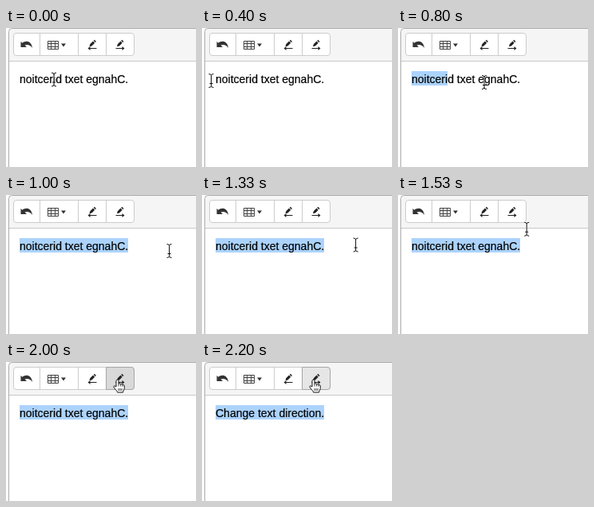
These frames come from a looping animation (238x174 px, 2.79 s). An HTML page:

```html
<!DOCTYPE html>
<html lang="en">
<head>
<meta charset="utf-8">
<title>Change text direction</title>
<style>
  html, body { margin: 0; height: 100%; overflow: hidden; background: #fff; }
  svg { display: block; width: 100vw; height: 100vh; }
  text { font: 14px "Liberation Sans", Arial, sans-serif; white-space: pre; stroke: #000; stroke-width: .2px; }
</style>
</head>
<body>
<svg viewBox="0 0 238 174">
  <defs>
    <path id="pencil" fill="#222" d="M0 8.500 .8 5.500 4.500 1.800 6.700 4 3 7.700ZM5.200 1.100 6.300 0 8.500 2.200 7.400 3.300Z"/>
    <path id="arrow" fill="#222" d="M0 2.500 3 0V2H11V3H3V5Z"/>
    <path id="stem" d="M-3-8.500Q0-8.500 0-6.500 0-8.500 3-8.500M0-6.500V6.500M-3 8.500Q0 8.500 0 6.500 0 8.500 3 8.500M-2 3.500H2"/>
  </defs>

  <path d="M3.500 180V4.500Q3.500.5 7.500.5H240V41.500H3.500" fill="#f5f5f5"/>
  <path d="M3.500 41.500H240" stroke="#c8c8c8"/>
  <path d="M3.500 180V4.500Q3.500.5 7.500.5H240" fill="none" stroke="#aaa"/>

  <rect x="9.500" y="6.500" width="151" height="28" rx="3.500" fill="#fff" stroke="#ccc"/>
  <path d="M42.500 7V34M90.500 7V34M125.500 7V34" stroke="#ccc"/>
  <path id="button" d="M125.500 6.500H157Q160.500 6.500 160.500 10V31Q160.500 34.500 157 34.500H125.500Z" stroke="#a6a6a6"/>

  <path fill="#333" d="M18.500 17 20.500 18.800C25 15 32 16.500 33 25 30 21 27 20.500 23.500 21.600L26 24H18.500Z"/>
  <path fill="none" stroke="#444" d="M52.500 16.500H65.500V26.500H52.500ZM52 19.500H66M52 23.500H66M56.500 16V27M61.500 16V27"/>
  <path fill="#333" d="M69 19.500H75L72 23.500Z"/>
  <use href="#pencil" x="104.500" y="14.800"/>
  <use href="#arrow" x="102.500" y="23"/>
  <use href="#pencil" x="139" y="14.800"/>
  <use href="#arrow" transform="translate(148.500 23) scale(-1 1)"/>

  <rect id="selection" x="17" y="54" height="18" fill="#acd3fc"/>
  <text id="label" x="17" y="69"></text>

  <g id="beam" fill="none">
    <use href="#stem" stroke="#fff" stroke-width="2.400" stroke-opacity=".7"/>
    <use href="#stem" stroke="#111"/>
  </g>
  <g id="hand" stroke="#111" stroke-linejoin="round">
    <path fill="#fff" d="M-3 1V-6.500C-3-8.300 0-8.300 0-6.500V-2.500C.5-3.500 2.600-3.300 2.600-1.900 3.200-2.700 5-2.500 5-1.200 5.600-1.700 7.300-1.500 7.300.1V2.500C7.300 4.500 5.800 5.500 5.600 8H-1.400C-1.800 6-5 3.500-6 1.500-6.700.1-4.800-.7-3 1Z"/>
    <path fill="none" stroke-width=".8" d="M0-2.500V.5M2.600-1.900V.5M5-1.200V.8M0 3V6M2 3V6M4 3V6"/>
  </g>
</svg>
<script>
const $ = id => document.getElementById(id);
const LOOP = 2790;
const phrase = "Change text direction.";
const reversed = [...phrase].reverse().join("").replace(/^\.(.*)/, "$1.");

// Times are in ticks of 1/15 s.
const DRAG_START = 9, DRAG_END = 15, DRAG_LAG = 1.3;
const PRESS = 30, FLIP = 32, RELEASE = 33;

// Pointer position: each glide carries on from where the last one ended.
function pointerAt(tick) {
  let x = 60, y = 64.5;
  const glide = (start, end, toX, toY, power = 1) => {
    const p = Math.min(1, Math.max(0, (tick - start) / (end - start)));
    const eased = 1 - (1 - p) ** power;
    x += (toX - x) * eased;
    y += (toY - y) * eased;
  };
  glide(0, 3, 20.5, 66);
  glide(5, 6, 11.5, 66);
  glide(DRAG_START, DRAG_END, 204.5, 70);
  glide(19, 26, 141, 30, 1.35);
  return { x, y };
}

// The selection trails the pointer and snaps to whole letters.
function selectionWidth(tick) {
  if (tick <= DRAG_START) return 0;
  const edge = pointerAt(Math.min(tick, DRAG_END) - DRAG_LAG).x;
  const label = $("label");
  const count = [...phrase].filter((_, i) => label.getEndPositionOfChar(i).x - 3 < edge).length;
  return count ? Math.round(label.getSubStringLength(0, count)) : 0;
}

function show(id, visible) {
  $(id).style.display = visible ? "" : "none";
}

function draw(now) {
  const tick = Math.floor((Math.floor(now % LOOP / 10) + 0.5) * 0.15);
  const { x, y } = pointerAt(tick);
  const hovering = y < 40;

  $("label").textContent = tick < FLIP ? reversed : phrase;
  $("selection").setAttribute("width", selectionWidth(tick));

  show("beam", !hovering);
  show("hand", hovering);
  $(hovering ? "hand" : "beam").setAttribute("transform", `translate(${x} ${y})`);

  show("button", hovering);
  $("button").setAttribute("fill", tick >= PRESS && tick < RELEASE ? "#d9d9d9" : "#e6e6e6");
  requestAnimationFrame(draw);
}
requestAnimationFrame(draw);
</script>
</body>
</html>
```
